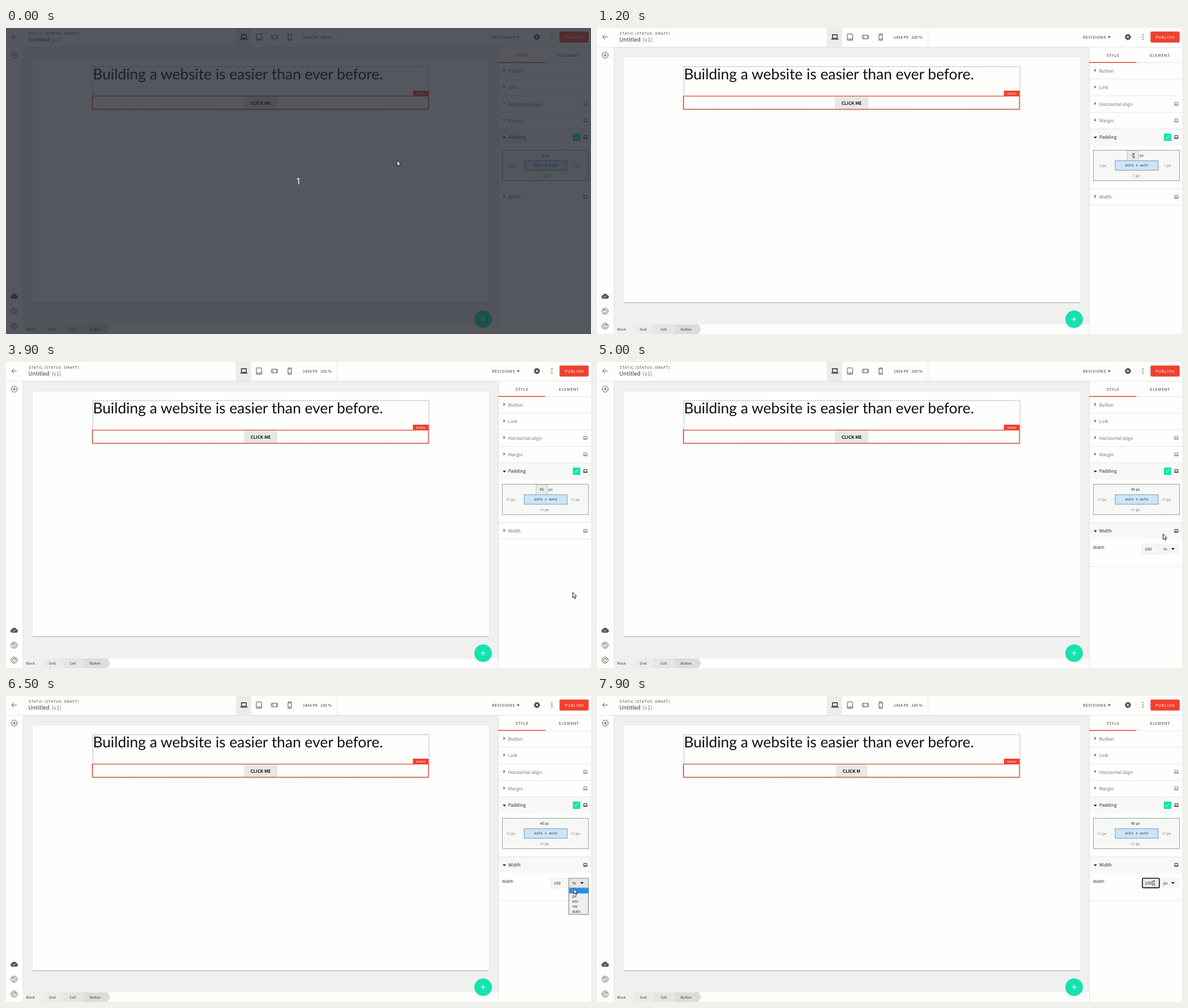
Animation, 1033 px wide and 542 px high, one loop 8 s. Source, as an HTML page:

```html
<!DOCTYPE html>
<html lang="en">
<head>
<meta charset="utf-8">
<title>Page builder</title>
<style>
html, body { margin: 0; width: 100%; height: 100%; overflow: hidden; background: #fefefd; }
svg { display: block; width: 1033px; height: 542px; }
text { font-family: "Noto Sans CJK SC", "Noto Sans CJK JP", "Open Sans", sans-serif; fill: #333;
  text-rendering: geometricPrecision; white-space: pre; }
.heading { font: 26.37px Lato, sans-serif; fill: #111; }
.caps { font-size: 6.75px; letter-spacing: .8px; font-weight: 500; }
.label { font-size: 8.05px; fill: #777; }
.dark { fill: #2c2c2c; }
.num { font-size: 6.6px; }
.pale { fill: #aaa; }
.unit { fill: #777; }
.mono { font: 6.2px "DejaVu Sans Mono", monospace; }
.field { font-size: 7.2px; }
.list { font: 7.3px "Liberation Sans", sans-serif; }
.crumb { font-size: 6px; }
.bold { font-size: 7.8px; font-weight: 700; fill: #111; }
.mid { text-anchor: middle; }
.end { text-anchor: end; }
.line { fill: none; stroke: #555; stroke-width: 1; }
.rule { stroke: #e7e7e6; stroke-width: 1; }

/* Visibility windows over the 8 s loop: 1.25% is 100 ms */
.v { animation: 8s step-end infinite; }
@keyframes intro { 0% { opacity: 1 } 3.75%, to { opacity: 0 } }
@keyframes idle { 0% { opacity: 1 } 15%, to { opacity: 0 } }
@keyframes frame { 0% { opacity: 0 } 15% { opacity: 1 } 57.5%, to { opacity: 0 } }
@keyframes editing { 0% { opacity: 0 } 15% { opacity: 1 } 58.75%, to { opacity: 0 } }
@keyframes typed0 { 0% { opacity: 1 } 35%, to { opacity: 0 } }
@keyframes typed4 { 0% { opacity: 0 } 35% { opacity: 1 } 40%, to { opacity: 0 } }
@keyframes typed40 { 0% { opacity: 0 } 40%, to { opacity: 1 } }
@keyframes marked { 0% { opacity: 0 } 21.25% { opacity: 1 } 35%, to { opacity: 0 } }
@keyframes side0 { 0% { opacity: 1 } 37.5%, to { opacity: 0 } }
@keyframes side4 { 0% { opacity: 0 } 37.5% { opacity: 1 } 42.5%, to { opacity: 0 } }
@keyframes side40 { 0% { opacity: 0 } 42.5%, to { opacity: 1 } }
@keyframes done { 0% { opacity: 0 } 58.75%, to { opacity: 1 } }
@keyframes closed { 0% { opacity: 1 } 62.5%, to { opacity: 0 } }
@keyframes opened { 0% { opacity: 0 } 62.5%, to { opacity: 1 } }
@keyframes hover { 0% { fill: #777; stroke: #777 } 58.75%, to { fill: #2c2c2c; stroke: #2c2c2c } }
@keyframes select { 0% { opacity: 0 } 71.25% { opacity: 1 } 92.5%, to { opacity: 0 } }
@keyframes menu { 0% { opacity: 0 } 78.75% { opacity: 1 } 91.25%, to { opacity: 0 } }
@keyframes pick { 0% { transform: none } 82.5%, to { transform: translateY(9.2px) } }
@keyframes left { 0% { fill: #fff } 82.5%, to { fill: #333 } }
@keyframes picked { 0% { fill: #333 } 82.5%, to { fill: #fff } }
@keyframes percent { 0% { opacity: 1 } 92.5%, to { opacity: 0 } }
@keyframes pixels { 0% { opacity: 0 } 92.5%, to { opacity: 1 } }
@keyframes focus { 0% { opacity: 0 } 97.5%, to { opacity: 1 } }
@keyframes caret { 0% { opacity: 0 } 98.75%, to { opacity: 1 } }
@keyframes arrow { 0% { opacity: 1 } 12.5% { opacity: 0 } 41.25% { opacity: 1 } 95%, to { opacity: 0 } }
@keyframes beam { 0% { opacity: 0 } 12.5% { opacity: 1 } 41.25% { opacity: 0 } 95%, to { opacity: 1 } }

#pointer { animation: travel 8s step-end infinite; }
@keyframes travel {
  0% { transform: translate(691px, 235px) }
  3.75% { transform: translate(783px, 242px); animation-timing-function: steps(4) }
  8.75% { transform: translate(908px, 235px); animation-timing-function: steps(4) }
  13.75% { transform: translate(948px, 226px) }
  18.75% { transform: translate(948px, 226px); animation-timing-function: steps(3) }
  22.5% { transform: translate(942px, 226px) }
  28.75% { transform: translate(941px, 225.5px) }
  40% { transform: translate(941px, 225.5px); animation-timing-function: steps(4) }
  45% { transform: translate(1010px, 358px) }
  47.5% { transform: translate(1004px, 398px) }
  48.75% { transform: translate(1001.3px, 408.5px); animation-timing-function: steps(2) }
  51.25% { transform: translate(1001px, 411px) }
  53.75% { transform: translate(1001px, 410px); animation-timing-function: steps(3) }
  57.5% { transform: translate(1000px, 313px) }
  58.75% { transform: translate(1000px, 305px) }
  65% { transform: translate(1000px, 306px); animation-timing-function: steps(8) }
  75% { transform: translate(1002.3px, 334.5px) }
  78.75% { transform: translate(1002.3px, 334.5px); animation-timing-function: steps(5) }
  85% { transform: translate(1004.5px, 352px); animation-timing-function: steps(4) }
  90% { transform: translate(1006.3px, 351.7px); animation-timing-function: steps(5) }
  96.25%, to { transform: translate(983.5px, 331px) }
}
</style>
</head>
<body>
<svg viewBox="0 0 1033 542">
  <defs>
    <g id="laptop">
      <path d="M-2.8-2.7H2.8V1.5H-2.8Z" fill="none"/>
      <path d="M-3.8 2.4H3.8" fill="none"/>
    </g>
    <path id="shut" d="M0-3 3 0 0 3Z" fill="#666"/>
    <path id="open" d="M0 0H6L3 3.2Z" fill="#222"/>
    <g id="turn" class="line">
      <circle r="5.4"/>
      <path d="M-2.4-1.6A2.8 2.8 0 1 1-2.4 1.6M-2.6-3V-1H-.6"/>
    </g>
  </defs>

  <!-- Workspace -->
  <rect width="1033" height="542" fill="#fefefd"/>
  <rect x="30" y="34" width="839" height="491" fill="#f0f0ef"/>
  <path d="M30 34.5H869" stroke="#dfdfde"/>
  <path d="M0 34H1033" stroke="#e2e2e1"/>
  <path d="M30 34V542M869.5 34V542" stroke="#e2e2e1"/>
  <rect x="46.5" y="51.5" width="807" height="435" fill="#e2e2e1"/>
  <rect x="47" y="52" width="806" height="434" fill="#fefefd"/>
  <path d="M47 486.5H853" stroke="#a9a9a8"/>

  <!-- Top bar -->
  <path class="line" d="M19 16H10M14 12 10 16 14 20" stroke-width="1.1"/>
  <text class="caps" x="40" y="12" style="font-size:6.27px;letter-spacing:.85px;font-weight:400">STATIC (STATUS: DRAFT)</text>
  <text x="39.5" y="24.3" font-size="9.75">Untitled</text>
  <text x="80.5" y="24.3" font-size="9.75" class="unit">(v1)</text>
  <rect x="406" width="27" height="34" fill="#ececeb"/>
  <path class="rule" d="M406.5 0V34M584.5 0V34"/>
  <g class="line">
    <path d="M415.7 12H424.3V18.2H415.7ZM413.5 19.8H426.5" stroke="#222" stroke-width="1.3"/>
    <rect x="442" y="10.5" width="9.5" height="11.5" rx="1"/>
    <path d="M442 19.5H451.5M446 20.8H447.5"/>
    <rect x="468.5" y="12.8" width="11" height="6.4" rx="1"/>
    <path d="M471 13V19M477.5 13V19"/>
    <rect x="498" y="10.5" width="6" height="11.5" rx="1"/>
    <path d="M498 12.3H504M498 19.8H504"/>
  </g>
  <text x="524" y="18.8" font-size="6.9" letter-spacing=".15">1454 PX</text>
  <text x="555" y="18.8" font-size="6.9" letter-spacing=".15">100 %</text>
  <text class="caps" x="858" y="18.8" style="font-size:6.9px;letter-spacing:.7px">REVISIONS</text>
  <path d="M902 15H907L904.5 17.7Z" fill="#333"/>
  <circle cx="937.5" cy="16" r="3.1" fill="none" stroke="#4a4a4a" stroke-width="2.6"/>
  <circle cx="937.5" cy="16" r="4.8" fill="none" stroke="#4a4a4a" stroke-width="1.5" stroke-dasharray="2.1 1.67"/>
  <path d="M964 12V12M964 16V16M964 20V20" stroke="#555" stroke-width="2" stroke-linecap="round"/>
  <rect x="977.4" y="6.3" width="51.4" height="19.5" rx="1.8" fill="#f0412f"/>
  <text class="caps mid" x="1003.4" y="18.8" style="fill:#fff">PUBLISH</text>

  <!-- Left bar -->
  <circle class="line" cx="14.5" cy="48" r="5.3"/>
  <path class="line" d="M11.5 48H17.5M14.5 45V51"/>
  <path d="M11 479.5A3.3 3.3 0 0 1 10.6 473A4.3 4.3 0 0 1 18.5 473.2A3.2 3.2 0 0 1 18 479.5Z" fill="#555"/>
  <path d="M11.9 475.5 13.6 477.2 16.7 474" fill="none" stroke="#fff"/>
  <use href="#turn" x="14.3" y="501.5"/>
  <use href="#turn" transform="translate(14.3 528) scale(-1 1)"/>

  <!-- Page content -->
  <rect x="153.5" y="68.5" width="593.5" height="76.5" fill="none" stroke="#888" stroke-dasharray="2 1.5" stroke-width=".9"/>
  <text class="heading" x="153.4" y="90.8">Building a website is easier than ever before.</text>
  <g class="v" style="animation-name:percent">
    <rect x="420" y="121.5" width="59.5" height="22" fill="#e6e9e6"/>
    <text class="bold mid" x="449.7" y="135.5">CLICK ME</text>
  </g>
  <g class="v" style="animation-name:pixels">
    <rect x="422" y="121.5" width="55.5" height="22" fill="#e6e9e6"/>
    <text class="bold mid" x="449.4" y="135.5">CLICK M</text>
  </g>
  <rect x="152.5" y="120.6" width="593.4" height="23.2" fill="none" stroke="#dc402e" stroke-width="1.2"/>
  <rect x="718.5" y="111" width="28" height="10" fill="#f0412f"/>
  <text class="mid" x="732.5" y="118" font-size="5.1" style="fill:#fff">button</text>

  <!-- Breadcrumbs, drawn from the last to the first -->
  <rect x="30" y="525" width="839" height="17" fill="#fdfdfc"/>
  <path d="M30 525H179L184 533.5 179 542H30Z" fill="#dcdcdb"/>
  <path d="M30 525H135L140 533.5 135 542H30Z" fill="#e5e5e4"/>
  <path d="M30 525H98L103 533.5 98 542H30Z" fill="#ebebea"/>
  <path d="M30 525H61L66 533.5 61 542H30Z" fill="#f0f0ef"/>
  <text class="crumb" x="35.5" y="536">Block</text>
  <text class="crumb" x="76" y="536">Grid</text>
  <text class="crumb" x="112.5" y="536">Cell</text>
  <text class="crumb" x="147.8" y="536">Button</text>

  <circle cx="842.6" cy="516.5" r="15.6" fill="#000" opacity=".1"/>
  <circle cx="842.5" cy="515.7" r="15.4" fill="#14e3b0"/>
  <path d="M838.3 515.7H846.7M842.5 511.5V519.9" stroke="#fff" stroke-width="1.1"/>

  <!-- Style panel -->
  <text class="caps mid" x="911.2" y="50.5">STYLE</text>
  <text class="caps mid" x="994.4" y="50.5">ELEMENT</text>
  <path class="rule" d="M870 61.5H1033M870 90.5H1033M870 120H1033M870 149.5H1033M870 178.5H1033M870 284.5H1033"/>
  <path d="M869 61H952.5" stroke="#e0483a" stroke-width="1.4"/>
  <rect x="870" y="179" width="163" height="29" fill="#f7f8f7"/>
  <use href="#shut" x="878.5" y="75"/>
  <use href="#shut" x="878.5" y="104.5"/>
  <use href="#shut" x="878.5" y="133.7"/>
  <use href="#shut" x="878.5" y="163"/>
  <use href="#open" x="877" y="192.5"/>
  <text class="label" x="886.8" y="79">Button</text>
  <text class="label" x="886.8" y="108.3">Link</text>
  <text class="label" x="886.8" y="137.6">Horizontal align</text>
  <text class="label" x="886.8" y="167">Margin</text>
  <text class="label dark" x="886.8" y="196.4">Padding</text>
  <g stroke="#777">
    <use href="#laptop" x="1023" y="134.5"/>
    <use href="#laptop" x="1023" y="163.8"/>
    <use href="#laptop" x="1023" y="193.3" stroke="#222"/>
  </g>
  <rect x="1001" y="187" width="13" height="13" fill="#14e3b0"/>
  <g transform="translate(1007.5 193.5) rotate(-45)" fill="none" stroke="#fff" stroke-width=".6">
    <path d="M-.8-1.1H-2.2A1.1 1.1 0 0 0-2.2 1.1H-.8M.8-1.1H2.2A1.1 1.1 0 0 1 2.2 1.1H.8M-1.5 0H1.5"/>
  </g>

  <!-- Padding editor -->
  <rect x="876.5" y="216.5" width="152" height="54" fill="#f7f8f6" stroke="#3c6656" stroke-dasharray="1.8 1.3"/>
  <rect x="915" y="235" width="76" height="17" fill="#cbe5f9" stroke="#3a5670" stroke-dasharray="1.8 1.3"/>
  <text class="mono mid" x="953" y="245.4">auto x auto</text>
  <g class="v" style="animation-name:idle">
    <text class="num dark end" x="950" y="228.4">0</text>
    <text class="num" x="951.4" y="228.4">px</text>
  </g>
  <g class="v" style="animation-name:done">
    <text class="num dark end" x="950" y="228.4">40</text>
    <text class="num" x="951.4" y="228.4">px</text>
  </g>
  <rect class="v" style="animation-name:frame" x="936" y="217.3" width="20" height="17.4" fill="#e9ebea" stroke="#a9c3bf"/>
  <g class="v" style="animation-name:editing">
    <text class="num dark mid v" style="animation-name:typed0" x="946" y="228.4">0</text>
    <text class="num dark mid v" style="animation-name:typed4" x="946" y="228.4">4</text>
    <text class="num dark mid v" style="animation-name:typed40" x="946" y="228.4">40</text>
    <text class="num" x="958" y="228.4">px</text>
  </g>
  <g class="v" style="animation-name:marked">
    <rect x="943.8" y="221.7" width="4.4" height="8.6" fill="#3a92e6"/>
    <text class="num mid" x="946" y="228.4" style="fill:#fff">0</text>
  </g>
  <g class="num">
    <g class="v" style="animation-name:side0">
      <text class="pale end" x="890.7" y="246">0</text>
      <text class="pale end" x="1004.7" y="246">0</text>
      <text class="pale end" x="950" y="263.8">0</text>
    </g>
    <g class="v" style="animation-name:side4">
      <text class="pale end" x="890.7" y="246">4</text>
      <text class="pale end" x="1004.7" y="246">4</text>
      <text class="pale end" x="950" y="263.8">4</text>
    </g>
    <g class="v" style="animation-name:side40">
      <text class="pale end" x="890.7" y="246">40</text>
      <text class="pale end" x="1004.7" y="246">40</text>
      <text class="pale end" x="950" y="263.8">40</text>
    </g>
    <text class="unit" x="892" y="246">px</text>
    <text class="unit" x="1006" y="246">px</text>
    <text class="unit" x="951.4" y="263.8">px</text>
  </g>

  <!-- Width section -->
  <g class="v" style="animation-name:closed">
    <path class="rule" d="M870 313.5H1033"/>
    <use href="#shut" x="878.5" y="298.3"/>
  </g>
  <g class="v" style="animation-name:opened">
    <rect x="870" y="285" width="163" height="28.5" fill="#f7f8f7"/>
    <use href="#open" x="877" y="298.3"/>
    <path class="rule" d="M870 362.5H1033"/>
    <text class="field dark" x="876" y="331.4">Width</text>
    <rect x="962.5" y="322.8" width="31" height="17.2" fill="#f7f7f6" stroke="#e9e9e8"/>
    <rect x="993.8" y="322.8" width="35" height="17.2" fill="#f5f5f4"/>
    <rect class="v" style="animation-name:select" x="993.8" y="322.8" width="34.7" height="17.2" fill="#e6e6e5" stroke="#8a8a8a"/>
    <rect class="v" style="animation-name:focus" x="963.2" y="322.8" width="29.8" height="16.8" rx="1.8" fill="#ebebea" stroke="#111" stroke-width="1.6"/>
    <text class="field dark" x="967.6" y="334">100</text>
    <text class="list v" style="animation-name:percent" x="1000" y="333.9">%</text>
    <text class="list v" style="animation-name:pixels" x="1000" y="333.9">px</text>
    <path d="M1013.8 329.7H1020.2L1017 333Z" fill="#111"/>
    <path class="v" style="animation-name:caret" d="M980.7 327V335.5" stroke="#222" stroke-width=".7"/>
  </g>
  <g class="v" style="animation-name:hover">
    <text x="886.8" y="302.4" font-size="8.05" style="fill:inherit;stroke:none">Width</text>
    <use href="#laptop" x="1023" y="299.2"/>
  </g>
  <g class="v" style="animation-name:menu">
    <rect x="993.8" y="340.3" width="34.7" height="46.5" fill="#efefee" stroke="#777"/>
    <rect class="v" style="animation-name:pick" x="994.3" y="340.7" width="33.7" height="9" fill="#1e90f5"/>
    <text class="list v" style="animation-name:left" x="1000" y="347.4">%</text>
    <text class="list v" style="animation-name:picked" x="1000" y="356.6">px</text>
    <text class="list" x="1000" y="365.8">em</text>
    <text class="list" x="1000" y="375">vw</text>
    <text class="list" x="1000" y="384.2">auto</text>
  </g>

  <!-- Countdown -->
  <g class="v" style="animation-name:intro">
    <rect width="1033" height="542" fill="#21252e" opacity=".77"/>
    <text class="mid" x="516.6" y="277" style="font:500 16.5px 'Noto Sans',sans-serif;fill:#fff">1</text>
  </g>

  <g id="pointer">
    <path class="v" style="animation-name:arrow" d="M-.4-.4V9.2L1.8 7.3 3.3 10.8 4.9 10.1 3.4 6.8H6.3Z" fill="#fff" stroke="#111" stroke-width="1"/>
    <g class="v" style="animation-name:beam" fill="none">
      <path d="M-2-4.2Q0-4.2 0-3.2Q0-4.2 2-4.2M0-3.2V3.2M-2 4.2Q0 4.2 0 3.2Q0 4.2 2 4.2" stroke="#fff" stroke-width="2"/>
      <path d="M-2-4.2Q0-4.2 0-3.2Q0-4.2 2-4.2M0-3.2V3.2M-2 4.2Q0 4.2 0 3.2Q0 4.2 2 4.2" stroke="#222" stroke-width="1"/>
    </g>
  </g>
</svg>
</body>
</html>
```
